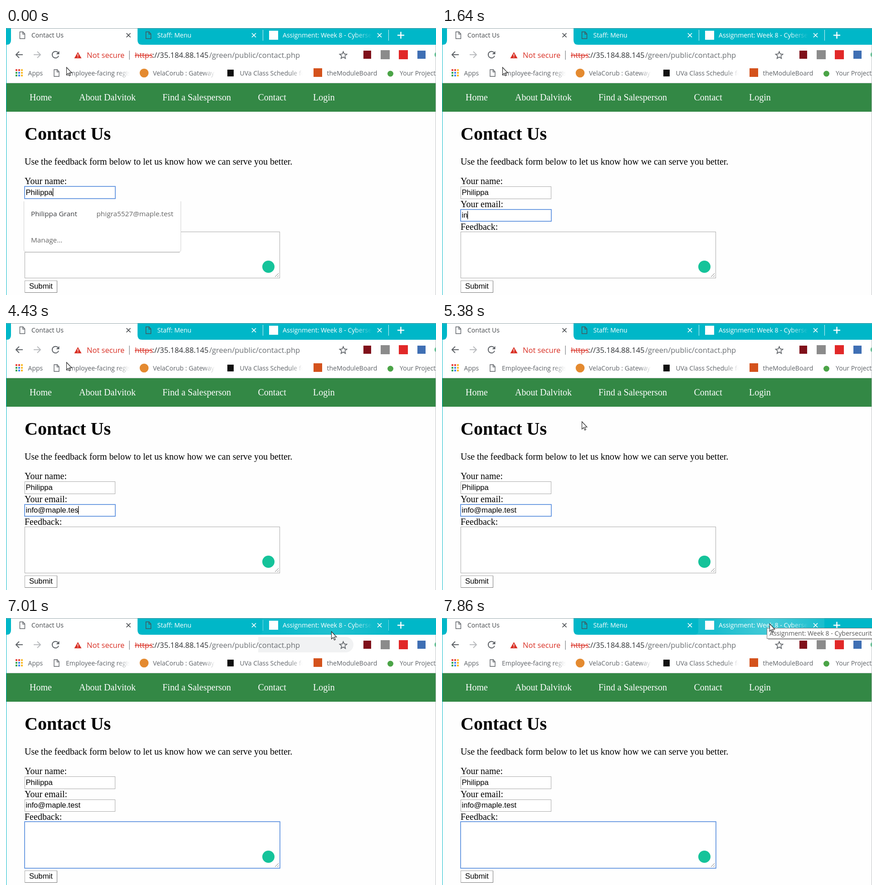
These frames come from a looping animation (948x590 px, 8 s). An HTML page:

```html
<!DOCTYPE html>
<html lang="en">
<head>
<meta charset="utf-8">
<title>Contact form</title>
<style>
html, body { margin: 0; width: 100%; height: 100%; overflow: hidden; background: #fefefe; }
svg { display: block; width: 948px; height: 590px; }
text { white-space: pre; }
.ui { font: 14.05px "Open Sans", "Noto Sans", sans-serif; fill: #5f6368; }
.url { font-size: 16.5px; }
.drop { font-size: 15.3px; fill: #666; }
.page { font: 20px "Liberation Serif", "Times New Roman", serif; }
.form { font: 16.667px "Liberation Sans", Arial, sans-serif; }
.nav, .ui.on { fill: #fff; }
.line { fill: none; stroke: #5f6368; stroke-width: 2; }
.box { fill: #fff; stroke: #a9a9a9; }
.ring { fill: none; stroke: #5b93e6; stroke-width: 1.6; }
.hide { display: none; }
</style>
</head>
<body>
<svg viewBox="0 0 948 590">
<defs>
  <linearGradient id="fade"><stop offset=".8" stop-color="#fff"/><stop offset="1" stop-color="#fff" stop-opacity="0"/></linearGradient>
  <mask id="m1" maskUnits="userSpaceOnUse" x="132" y="85" width="141" height="30"><rect x="132" y="85" width="141" height="30" fill="url(#fade)"/></mask>
  <mask id="m2" maskUnits="userSpaceOnUse" x="322" y="85" width="140" height="30"><rect x="322" y="85" width="140" height="30" fill="url(#fade)"/></mask>
  <mask id="m3" maskUnits="userSpaceOnUse" x="514" y="85" width="140" height="30"><rect x="514" y="85" width="140" height="30" fill="url(#fade)"/></mask>
  <mask id="m4" maskUnits="userSpaceOnUse" x="608" y="1" width="199" height="34"><rect x="608" y="1" width="199" height="34" fill="url(#fade)"/></mask>
  <radialGradient id="glow" gradientUnits="userSpaceOnUse" cx="722" cy="20" r="120">
    <stop offset="0" stop-color="#fff" stop-opacity=".2"/><stop offset="1" stop-color="#fff" stop-opacity="0"/>
  </radialGradient>
  <path id="doc" d="M1 1H8L12 5.500V16H1ZM7.500 1.500V6H12" fill="none" stroke-width="1.4"/>
  <path id="shut" d="M-4.500 -4.500L4.500 4.500M4.500 -4.500L-4.500 4.500" stroke-width="1.7"/>
  <path id="tab" d="M556 37Q565 37 565 28V1H843V28Q843 37 852 37Z"/>
</defs>

<!-- tab strip -->
<rect width="948" height="37" fill="#00b7c8"/>
<path d="M1 37Q11 37 11 27V1H290V27Q290 37 300 37Z" fill="#fff"/>
<g id="hover"><use href="#tab" fill="#fff" fill-opacity=".1"/><use href="#tab" fill="url(#glow)"/></g>
<g id="seps" fill="#d9f4f7"><rect x="566" y="4" width="1" height="24"/><rect x="843" y="4" width="1" height="24"/></g>
<rect width="948" height="1" fill="#93a5a8"/>
<use href="#doc" x="29.500" y="7.500" stroke="#5f6368"/>
<text class="ui" x="56" y="21" style="fill:#45494d">Contact Us</text>
<use href="#shut" x="270" y="16" stroke="#45494d"/>
<use href="#doc" x="307.500" y="7.500" stroke="#45565b"/>
<text class="ui on" x="333.500" y="21">Staff: Menu</text>
<use href="#shut" x="546.500" y="16" stroke="#fff"/>
<rect x="580" y="6" width="20" height="20" fill="#fff"/>
<text class="ui on" x="610" y="21" mask="url(#m4)">Assignment: Week 8 - Cybersecurity</text>
<use href="#shut" x="823.500" y="16" stroke="#fff"/>
<path d="M863 16H878M870.500 8.500V23.500" stroke="#fff" stroke-width="2.500"/>

<!-- toolbar -->
<rect y="37" width="948" height="84" fill="#fff"/>
<path id="omni" d="M556 42H749A17 17 0 0 1 749 76H556Z" fill="#f1f2f3"/>
<path class="line" d="M37 59H22M29 52L22 59L29 66"/>
<path class="line" d="M61 59H76M69 52L76 59L69 66" style="stroke:#b9bbbe"/>
<path class="line" d="M114.500 54A7.300 7.300 0 1 0 116 61.500"/>
<path d="M117.500 51V58H110.500Z" fill="#5f6368"/>
<path d="M158.500 53L166.500 67H150.500Z" fill="#d93025"/>
<path d="M158.500 57.500V62M158.500 63.500V65" stroke="#fff" stroke-width="1.6"/>
<g class="ui">
  <g class="url">
    <text x="178" y="66" fill="#d93025">Not secure</text>
    <text x="284" y="66" fill="#d93025">https</text>
    <text x="322.500" y="66" fill="#303336">://35.184.88.145</text>
    <text x="448" y="66" fill="#6b6f73">/green/public/contact.php</text>
  </g>
</g>
<rect x="284" y="60" width="38" height="1.500" fill="#d93025"/>
<rect x="271.500" y="50" width="1.300" height="20" fill="#85888c"/>
<path d="M743.500 52L745.700 57.400L751.500 57.900L747.100 61.700L748.400 67.300L743.500 64.300L738.600 67.300L739.900 61.700L735.500 57.900L741.300 57.400Z" class="line" style="stroke-width:1.6"/>
<rect x="788" y="50" width="17" height="18" fill="#80101a"/>
<rect x="826" y="49" width="20" height="20" fill="#8b8b8b"/>
<rect x="866" y="49" width="20" height="20" fill="#e12828"/>
<rect x="907" y="50" width="18" height="18" fill="#3f6fb4"/>
<circle cx="953" cy="59" r="8" fill="#2bb673"/>

<!-- bookmarks -->
<g id="apps"></g>
<text class="ui" x="48.500" y="105">Apps</text>
<use href="#doc" x="105" y="91" stroke="#5f6368"/>
<text class="ui" x="132" y="105" mask="url(#m1)">Employee-facing registry</text>
<circle cx="304.500" cy="99.500" r="9.800" fill="#e48a30"/>
<text class="ui" x="324" y="105" mask="url(#m2)">VelaCorub : Gateway</text>
<rect x="488" y="92" width="14" height="15" fill="#111"/>
<text class="ui" x="515.500" y="105" mask="url(#m3)">UVa Class Schedule for</text>
<rect x="678" y="89" width="19" height="19" fill="#d4521c"/>
<text class="ui" x="707.500" y="105">theModuleBoard</text>
<circle cx="847.500" cy="101" r="6.500" fill="#4ba447"/>
<text class="ui" x="868" y="105">Your Projects</text>
<rect y="121" width="948" height="1" fill="#d3d6d8"/>

<!-- page -->
<rect y="122" width="948" height="63" fill="#338845"/>
<g class="page nav">
  <text x="52" y="160">Home</text><text x="161" y="160">About Dalvitok</text>
  <text x="345" y="160">Find a Salesperson</text><text x="555.500" y="160">Contact</text>
  <text x="677" y="160">Login</text>
</g>
<g class="page">
  <text x="41" y="247" style="font-size:40px;font-weight:bold">Contact Us</text>
  <text x="41" y="302">Use the feedback form below to let us know how we can serve you better.</text>
  <text x="41" y="345">Your name:</text><text x="41" y="396">Your email:</text><text x="41" y="446">Feedback:</text>
</g>
<rect class="box" x="41.500" y="350.500" width="199" height="27"/>
<rect class="box" x="41.500" y="401.500" width="199" height="26"/>
<rect class="box" x="41.500" y="450.500" width="562" height="102"/>
<path d="M593 550L601 542M598 550L601 547" stroke="#777"/>
<circle cx="578.500" cy="527.500" r="13.500" fill="#15c39a"/>
<rect class="box" x="41.500" y="558.500" width="71" height="26"/>
<path d="M42 584.500H112.500V559" fill="none" stroke="#777"/>
<rect class="ring" id="ring"/>
<g class="form">
  <text id="name" x="43.500" y="369">Philippa</text>
  <text id="mail" x="43.500" y="419"></text>
  <text x="51" y="576">Submit</text>
</g>

<g id="drop">
  <path d="M39.500 379H385.500V491Q385.500 496 380 496H45Q39.500 496 39.500 491Z" fill="#fff"/>
  <path d="M39.500 383V490Q39.500 495 45 495H380Q385.500 495 385.500 490V383" fill="none" stroke="#cfcfcf"/>
  <path d="M42 495.500H383" stroke="#bdbdbd" stroke-width="1.500"/>
  <g class="ui">
    <text class="drop" x="55" y="416" style="fill:#3a3c40">Philippa Grant</text>
    <text class="drop" x="199.500" y="416">phigra5527@maple.test</text>
    <text class="drop" x="55" y="474">Manage...</text>
  </g>
</g>
<rect id="caret" width="1.200" height="18" fill="#000"/>

<rect width="1" height="590" fill="#00b7c8"/>
<rect x="947" y="37" width="1" height="553" fill="#bfc3c5"/>

<g id="tip">
  <rect x="719" y="25" width="240" height="23" fill="#000" fill-opacity=".25"/>
  <rect x="716.500" y="22.500" width="245" height="23" fill="#fff" stroke="#767676"/>
  <text class="ui" x="722" y="39" style="fill:#575757">Assignment: Week 8 - Cybersecurity</text>
</g>
<path id="arrow" d="M.5 0V16.500L4.200 13L6.800 18.800L9.200 17.700L6.700 12H11.800Z" fill="#fff" stroke="#222" stroke-width="1.100"/>
<path id="beam" d="M-4 -10.500H-1L0 -9.500L1 -10.500H4M0 -9.500V9.500M-4 10.500H-1L0 9.500L1 10.500H4" fill="none" stroke="#222" stroke-width="1.200"/>
</svg>

<script>
const LOOP = 8000, BLINK = 530;
const $ = id => document.getElementById(id);
const show = (id, on) => $(id).classList.toggle("hide", !on);
const clamp = v => Math.max(0, Math.min(1, v));
const ramp = (t, a, b) => clamp((t - a) / (b - a));
// last entry whose time has come
const at = (list, t) => list.reduce((best, e) => e[0] <= t ? e : best);

const typed = [
  [0, ""], [1640, "in"], [1770, "inf"], [1910, "info"], [2450, "info@"],
  [2730, "info@g"], [2860, "info@gm"], [3230, "info@g"], [3360, "info@"],
  [3490, "info@m"], [3620, "info@ma"], [3750, "info@map"], [3880, "info@maple"],
  [4160, "info@maple.t"], [4290, "info@maple.te"], [4420, "info@maple.tes"], [4550, "info@maple.test"]
];
const moves = [
  [0, 133, 87], [4980, 105, 150], [5110, 96, 210], [5250, 190, 262], [5380, 308, 218],
  [5530, 330, 290], [5660, 365, 385], [5800, 385, 430], [5930, 392, 464],
  [6350, 620, 190], [6500, 725, 74], [6620, 724, 64], [6770, 721, 50], [6890, 718, 38],
  [7010, 717, 30], [7160, 720, 22], [7410, 721, 5], [7560, 722, 13]
];
// start, ring box, caret top
const fields = [
  [0, 41, 350, 200, 27, 354],
  [520, 41, 401, 200, 26, 404.500],
  [6080, 41, 450, 563, 103, 455]
];

["#e8453c", "#e8453c", "#f9bb2d", "#3aa757", "#4688f1", "#f9bb2d", "#3aa757", "#4688f1", "#f9bb2d"].forEach((c, i) => {
  $("apps").innerHTML += `<rect x="${21 + i % 3 * 6}" y="${91 + Math.floor(i / 3) * 6}" width="4" height="4" fill="${c}"/>`;
});

function place(id, attrs) {
  for (const k in attrs) $(id).setAttribute(k, attrs[k]);
}

function draw(t) {
  const [typeTime, text] = at(typed, t);
  if ($("mail").textContent !== text) $("mail").textContent = text;
  const field = at(fields, t), [start, x, y, width, height, top] = field;
  place("ring", { x, y, width, height });

  const which = fields.indexOf(field);
  const since = which === 1 ? Math.max(start, typeTime) : start;
  const lit = which === 0 ? t < 270 : (t - since) % (2 * BLINK) < BLINK;
  const end = which === 2 ? 45 : 43.500 + (which ? text && $("mail").getComputedTextLength() : $("name").getComputedTextLength());
  place("caret", { x: Math.round(end), y: top });
  show("caret", lit);
  show("drop", t < 520);

  const [, cx, cy] = at(moves, t), overText = t >= 5930 && t < 6350;
  show("arrow", !overText);
  show("beam", overText);
  place(overText ? "beam" : "arrow", { transform: `translate(${cx} ${cy})` });

  place("omni", { opacity: t < 7160 ? ramp(t, 6500, 6770) : 1 - ramp(t, 7160, 7300) });
  const hover = ramp(t, 6890, 7160);
  place("hover", { opacity: hover });
  place("seps", { opacity: 1 - hover });
  place("glow", { cx, cy });
  place("tip", { opacity: ramp(t, 7690, 7850) });
}

function frame(now) {
  draw(now % LOOP);
  requestAnimationFrame(frame);
}
draw(0);
requestAnimationFrame(frame);
</script>
</body>
</html>
```
